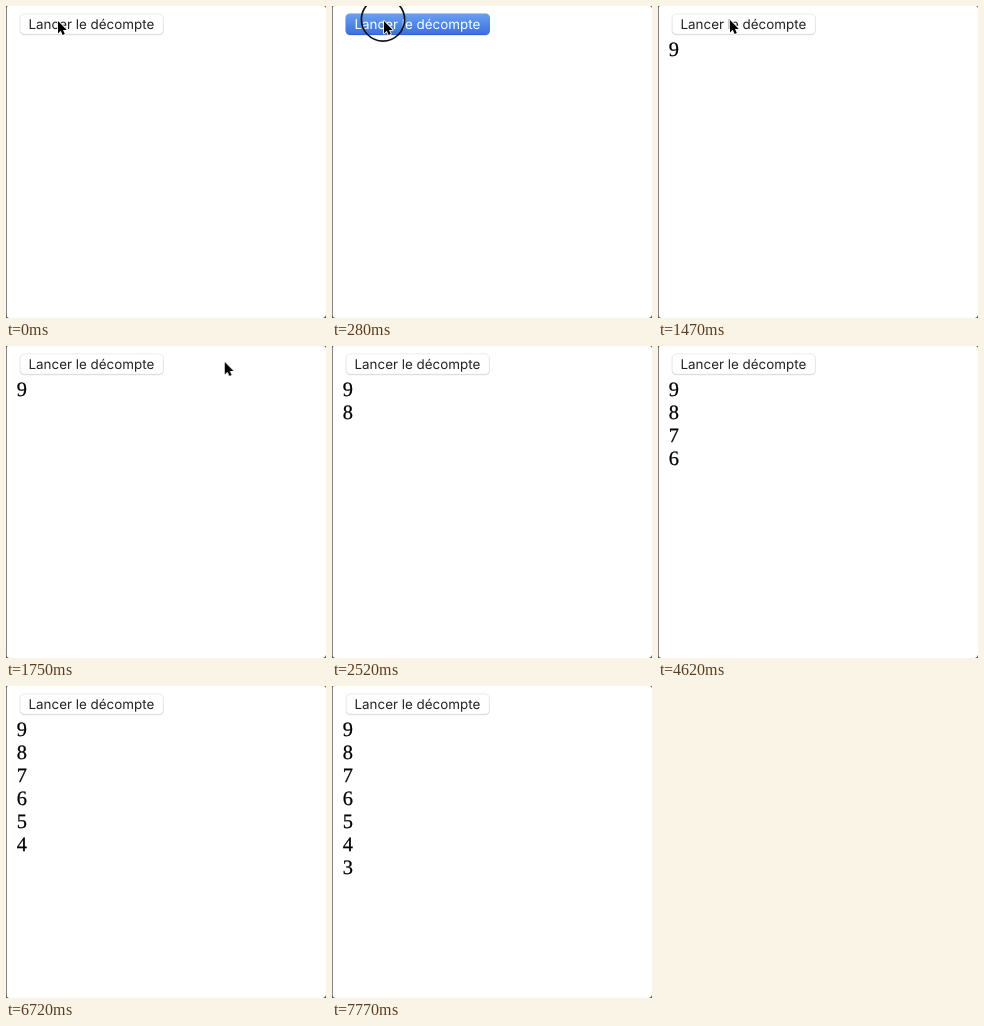
Write an HTML page that moves like this. It is 320 by 312 pixels and loops after 8000 ms.

```html
<!DOCTYPE html>
<html lang="fr">
<head>
<meta charset="utf-8">
<title>Décompte</title>
<style>
  html, body {
    margin: 0;
    width: 100%;
    height: 100%;
    overflow: hidden;
    background: #fff;
  }
  svg {
    display: block;
    width: 320px;
    height: 312px;
    text-rendering: geometricPrecision;
  }
  .label { font: 13.4px Inter, "Open Sans", sans-serif; fill: #222; }
  .digits {
    font: 20.4px "Liberation Serif", "Times New Roman", serif;
    fill: #000;
    stroke: #000;
    stroke-width: .25;
  }

  .pressed, .cover, .cursor { animation: 8s step-end infinite; }
  .pressed { animation-name: press; }
  .cover { animation-name: reveal; }
  .cursor { animation-name: move; }

  /* mouse down from 280 to 420 ms */
  @keyframes press {
    0% { visibility: hidden; }
    3.5% { visibility: visible; }
    5.25%, 100% { visibility: hidden; }
  }
  /* one more line every 1050 ms, starting at 1470 ms */
  @keyframes reveal {
    0% { transform: translateY(33px); }
    18.375% { transform: translateY(55px); }
    31.5% { transform: translateY(78px); }
    44.625% { transform: translateY(101px); }
    57.75% { transform: translateY(124px); }
    70.875% { transform: translateY(147px); }
    84% { transform: translateY(170px); }
    97.125%, 100% { transform: translateY(193px); }
  }
  /* the pointer speeds up and leaves on the right, 70 ms per step */
  @keyframes move {
    0% { transform: translate(52px, 15px); visibility: visible; }
    18.375% { transform: translate(72px, 14px); }
    19.25% { transform: translate(98.7px, 14px); }
    20.125% { transform: translate(132px, 14px); }
    21% { transform: translate(172px, 15px); }
    21.875% { transform: translate(218.7px, 16px); }
    22.75% { transform: translate(272px, 17px); visibility: visible; }
    23.625%, 100% { transform: translate(332px, 18px); visibility: hidden; }
  }
</style>
</head>
<body>
<svg viewBox="0 0 320 312">
  <defs>
    <linearGradient id="blue" x2="0" y2="1">
      <stop offset="0" stop-color="#6a9ff1"/>
      <stop offset="1" stop-color="#3a70dc"/>
    </linearGradient>
  </defs>

  <rect width="320" height="312" fill="#fff"/>

  <g class="digits">
    <text x="10.7" y="50">9</text>
    <text x="10.7" y="73">8</text>
    <text x="10.7" y="96">7</text>
    <text x="10.7" y="119">6</text>
    <text x="10.7" y="142">5</text>
    <text x="10.7" y="165">4</text>
    <text x="10.7" y="188">3</text>
  </g>
  <rect class="cover" x="2" width="40" height="240" fill="#fff"/>

  <!-- window edge -->
  <rect width="1" height="312" fill="#858585"/>
  <path d="M0 309v3h3q-2.4-.6-3-3zM320 309v3h-3q2.4-.6 3-3zM0 2V0H2Q.4.400 0 2zM320 2V0h-2q1.600.400 2 2z" fill="#555"/>

  <!-- button -->
  <rect x="13.5" y="7.5" width="144.5" height="22" rx="5" fill="#f1f1f1"/>
  <rect x="14" y="8.5" width="143.5" height="20.5" rx="4.5" fill="#cfcfcf"/>
  <rect x="14.2" y="8" width="143.100" height="20.2" rx="4.2" fill="#fff" stroke="#e6e6e6" stroke-width=".6"/>
  <text class="label" x="22.5" y="23.2">Lancer le décompte</text>

  <g class="pressed">
    <rect x="13.5" y="7.600" width="144.5" height="21.3" rx="4.2" fill="url(#blue)"/>
    <path d="M17 28.600h137.500" stroke="#2f5fc4" stroke-width=".8"/>
    <text class="label" x="22.5" y="23.2" style="fill:#fff">Lancer le décompte</text>
    <circle cx="51" cy="13.500" r="21.600" fill="none" stroke="#111" stroke-width="1.700"/>
  </g>

  <g class="cursor">
    <path d="M0 0V12.400L2.800 9.800 4.600 14 6.800 13 5 8.900H8.800Z"
      fill="#000" stroke="#fff" stroke-width="1.600" stroke-linejoin="round" paint-order="stroke"/>
  </g>
</svg>
</body>
</html>
```
